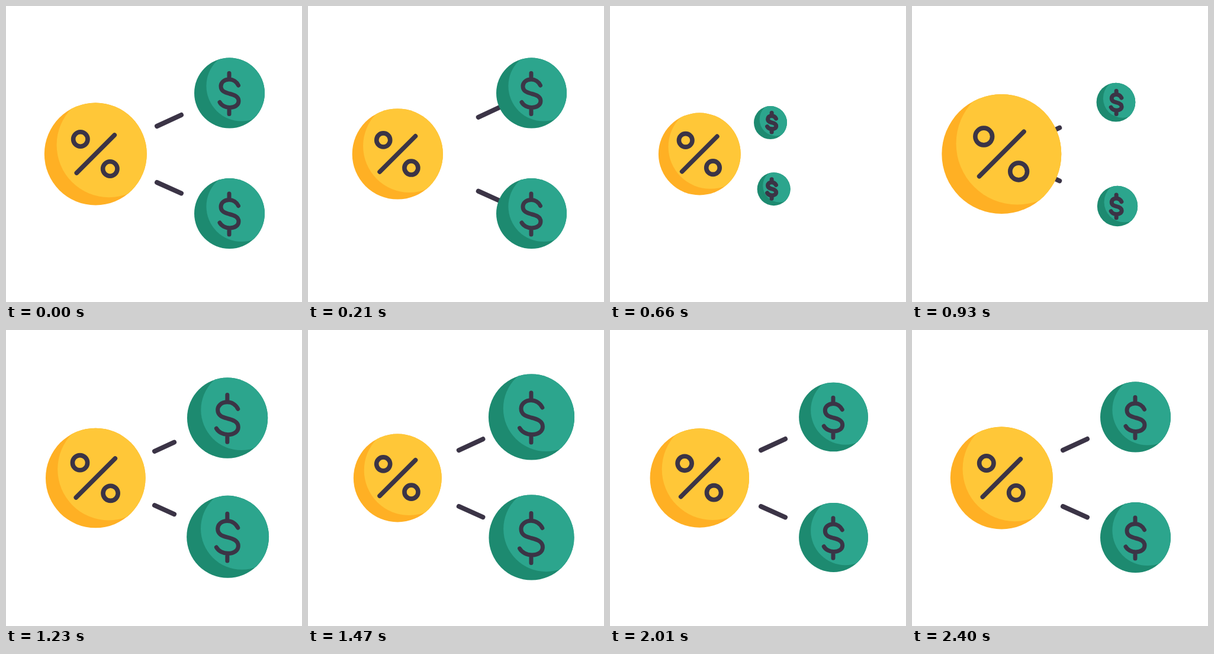
Recreate the animation shown at these times as an HTML page with a canvas. Size 500 px wide and 500 px high, loop 4430 ms.

```html
<!DOCTYPE html>
<html lang="en">
<head>
<meta charset="utf-8">
<title>Percent split into coins</title>
<style>
  html, body { margin: 0; width: 100%; height: 100%; overflow: hidden; background: #fff; }
  canvas { display: block; width: 100vmin; height: 100vmin; }
</style>
</head>
<body>
<canvas id="stage" width="500" height="500"></canvas>
<script>
const ctx = document.getElementById('stage').getContext('2d');
const LOOP = 4430, END = 2400, STEP = 30;
const INK = [59, 52, 70], FADED = [70, 117, 92];
const YELLOW_COIN = { base: '#ffb024', light: '#ffc738', dx: .262, dy: -.175, size: 1.022 };
const GREEN_COIN = { base: '#1d8a70', light: '#2ca58d', dx: .343, dy: -.2, size: 1 };
const REST = 377.5, RADIUS = 59.5;

// Resting height, slopes of the paths, and the [leaving, returning] head starts
const ARMS = [
  { y: 147, slope: -.47, outY: -53, coinLead: [0, 0], signLead: [8, 7], dashY: 203, dashSlope: -.463 },
  { y: 350.5, slope: .41, outY: 37.5, coinLead: [26, 15], signLead: [30, 7], dashY: 298, dashSlope: .45 }
];

const mix = (a, b, p) => a + (b - a) * p;
const clamp = p => Math.min(1, Math.max(0, p));
const ease = (t, from, to) => (1 - Math.cos(Math.PI * clamp((t - from) / (to - from)))) / 2;

// Eased value through [time, value] keys
function track(t, keys) {
  let value = keys[0][1];
  for (let i = 1; i < keys.length; i++) {
    const [from, a] = keys[i - 1], [to, b] = keys[i];
    if (t >= from) value = mix(a, b, ease(t, from, to));
  }
  return value;
}

function disc(x, y, r, color) {
  ctx.fillStyle = color;
  ctx.beginPath();
  ctx.arc(x, y, r, 0, 7);
  ctx.fill();
}

function coin(x, y, r, c) {
  disc(x, y, r, c.base);
  ctx.save();
  ctx.clip();
  disc(x + c.dx * r, y + c.dy * r, c.size * r, c.light);
  ctx.restore();
}

// Scales the shape but keeps the line weight
function stroke(path, x, y, scale, width, color) {
  const shape = new Path2D();
  shape.addPath(new Path2D(path), new DOMMatrix([scale, 0, 0, scale, x, y]));
  ctx.lineWidth = width;
  ctx.strokeStyle = `rgb(${color})`;
  ctx.stroke(shape);
}

const ring = (x, y, r) =>
  `M${x - r} ${y}a${r} ${r} 0 1 0 ${2 * r} 0a${r} ${r} 0 1 0 ${-2 * r} 0Z`;
const PERCENT = 'M-32 32L32 -32' + ring(-25.5, -25, 12.2) + ring(24.5, 25, 12.2);
const DOLLAR = 'M0 -34.5V-24M0 23.5V34.5M15.5 -14C12.5 -20 6.5 -24 0 -24' +
  'C-9 -24 -14 -18.5 -14 -12.5C-14 -4 -7 -2 0 0C8 2 16 4.5 16 12.5' +
  'C16 19 10 23.5 1 23.5C-6 23.5 -13 20 -16 14.5';

function dash(arm, t) {
  let start, end;
  if (t < 570) {
    start = mix(255, 375, ease(t, 0, 600));
    end = mix(296, 375, ease(t, 0, 460));
  } else if (t < 700) {
    return;
  } else {
    const left = (1 - clamp((t - 700) / 836)) ** 2;
    end = mix(296, 207, left);
    start = Math.min(end, mix(255, 225, left));
  }
  const y = x => arm.dashY + (x - 255) * arm.dashSlope;
  stroke(`M${start} ${y(start)}L${end} ${y(end)}`, 0, 0, 1, 8, INK);
}

function leaving(arm, t) {
  const p = ease(t, 241, 586);
  return [REST + 90 * p, arm.y + arm.outY * p, mix(RADIUS, 26.5, p)];
}

function returning(arm, t) {
  const left = Math.max(0, .00567 * (1496 - t)) ** 3;
  const r = track(t, [[815, 28], [1362, 74.5], [1850, 58], [2350, RADIUS]]);
  return [REST - left, arm.y - left * arm.slope, r];
}

function dollarCoin(arm, t) {
  if (t >= 525 && t < 570) return;
  const back = t >= 570;
  const pose = back ? returning : leaving;
  const lead = Number(back);
  coin(...pose(arm, t + arm.coinLead[lead]), GREEN_COIN);
  const [x, y, r] = pose(arm, t + arm.signLead[lead]);
  const fade = back ? 0 : clamp((t - 200) / 190);
  const color = INK.map((c, i) => Math.round(mix(c, FADED[i], fade)));
  stroke(DOLLAR, x - .5, y + 1, r / RADIUS, 7, color);
}

function percentCoin(t) {
  const scale = (low, high, dip) =>
    track(t, [[0, 1], [515, low], [950, high], [1430, dip], [2280, 1]]);
  coin(151.3, 250, 86.5 * scale(.68, 1.17, .86), YELLOW_COIN);
  stroke(PERCENT, 151.3, 250, scale(.84, 1.18, .945), 7.6, INK);
}

function draw(now) {
  const t = Math.min(END, Math.floor(now % LOOP / STEP) * STEP);
  ctx.fillStyle = '#fff';
  ctx.fillRect(0, 0, 500, 500);
  ctx.lineCap = ctx.lineJoin = 'round';
  ARMS.forEach(arm => dash(arm, t));
  ARMS.forEach(arm => dollarCoin(arm, t));
  percentCoin(t);
}

let origin;
function tick(now) {
  origin ??= now;
  draw(now - origin);
  requestAnimationFrame(tick);
}
draw(0);
requestAnimationFrame(tick);
</script>
</body>
</html>
```
